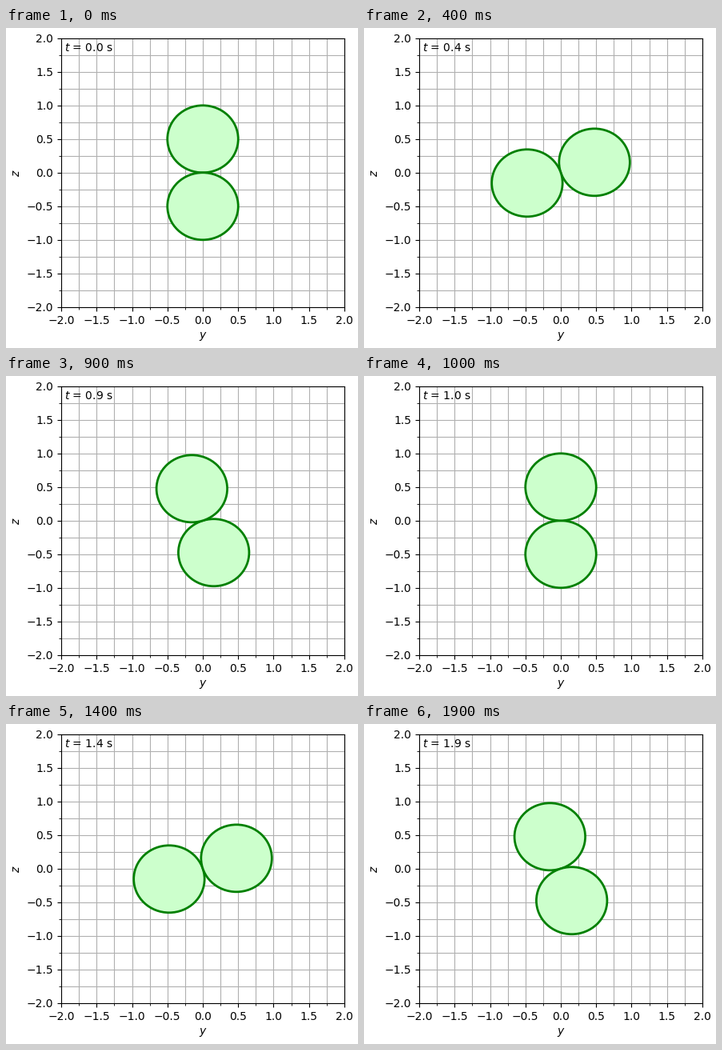
Recreate the animation shown at these times as a matplotlib script. Size 440 px wide and 400 px high, loop 2 s.

```python
import numpy as np
import matplotlib.pyplot as plt
from matplotlib.animation import FuncAnimation
from matplotlib.patches import Circle
from matplotlib.ticker import MultipleLocator

W, H, DPI = 440, 400, 100
FRAMES, INTERVAL = 20, 100
RADIUS = 0.5

plt.rcParams["font.family"] = "DejaVu Sans"
plt.rcParams["font.size"] = 10

fig = plt.figure(figsize=(W / DPI, H / DPI), dpi=DPI, facecolor="white")
ax = fig.add_axes([69.03 / W, 51.2 / H, 353.94 / W, 336 / H])
ax.set(xlim=(-2, 2), ylim=(-2, 2), xlabel="$y$", ylabel="$z$")
for axis in (ax.xaxis, ax.yaxis):
    axis.set_major_locator(MultipleLocator(0.5))
    axis.set_minor_locator(MultipleLocator(0.25))
ax.set_axisbelow(True)
ax.grid(True, which="both", color="#b0b0b0", linewidth=0.8)

discs = [
    ax.add_patch(Circle((0, side * RADIUS), RADIUS, facecolor="#ccffcc",
                        edgecolor="green", linewidth=2, zorder=2))
    for side in (1, -1)
]
clock = ax.text(-1.95, 1.81, "", zorder=3)


def update(i):
    """Turn the pair clockwise, half a turn per second."""
    t = i * INTERVAL / 1000
    y, z = RADIUS * np.sin(np.pi * t), RADIUS * np.cos(np.pi * t)
    for disc, side in zip(discs, (1, -1)):
        disc.center = side * y, side * z
    clock.set_text(f"$t$ = {t:.1f} s")
    return (*discs, clock)


anim = FuncAnimation(fig, update, frames=FRAMES, interval=INTERVAL,
                     init_func=lambda: update(0), repeat=True, repeat_delay=0)
plt.show()
```
